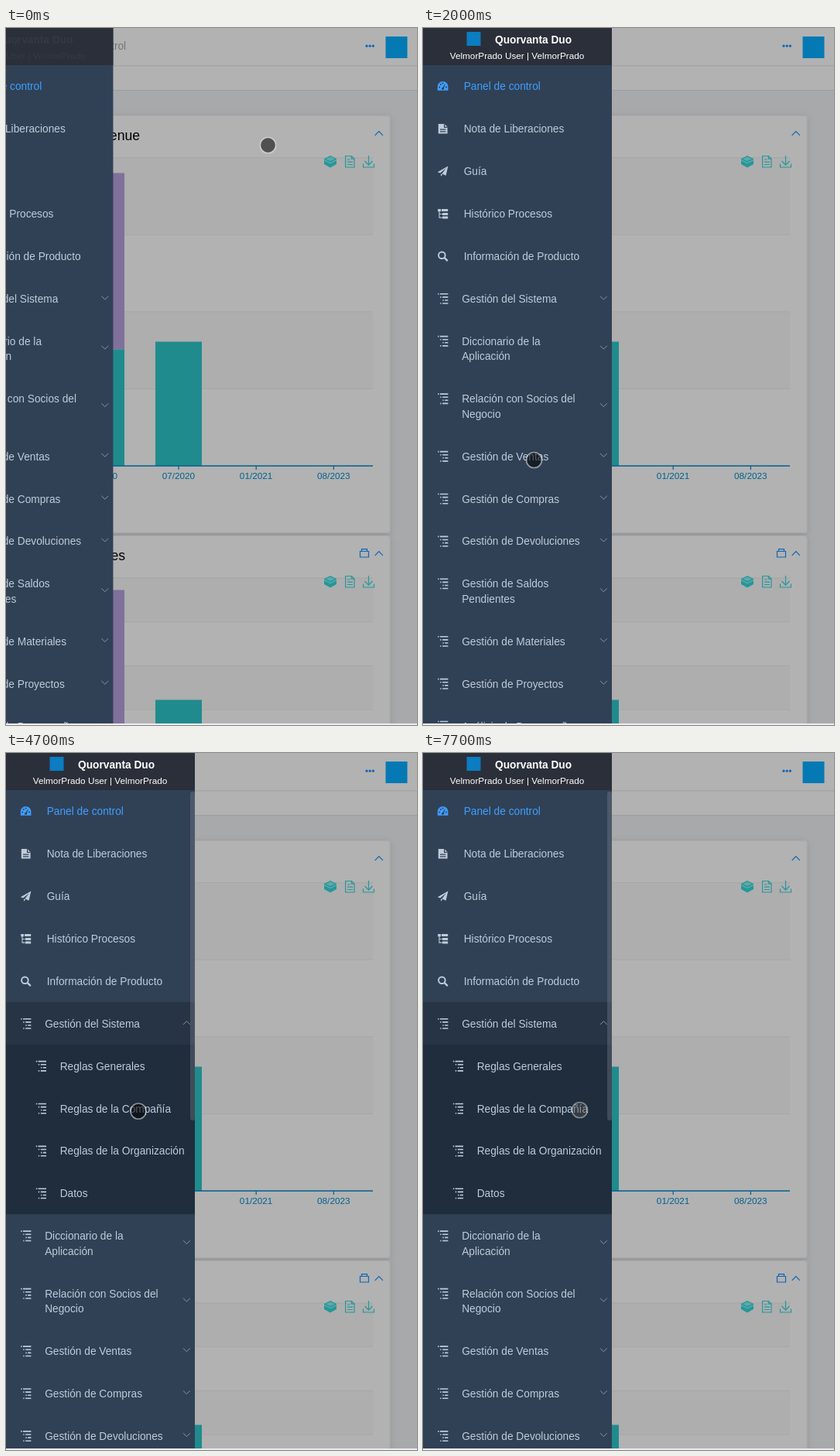
Recreate the animation shown at these times as an HTML page. Size 531 by 901 pixels, loop 8 s.

```html
<!DOCTYPE html>
<html lang="es">
<head>
<meta charset="utf-8">
<title>Panel de control</title>
<style>
  html, body { margin: 0; width: 100%; height: 100%; overflow: hidden; background: #a8a9ab; }
  svg { display: block; }
  text { font-family: "Liberation Sans", Arial, sans-serif; font-size: 13.72px; white-space: pre; }
  .small { font-size: 11.75px; }
  .title { font-size: 17.6px; }
</style>
</head>
<body>
<svg id="stage" width="531" height="901" viewBox="0 0 531 901">
  <defs>
    <filter id="shade" x="-10%" y="-10%" width="120%" height="120%">
      <feDropShadow dx="0" dy="2" stdDeviation="5" flood-color="#000" flood-opacity=".13"/>
    </filter>
    <g id="gauge">
      <path d="M-6.8 5.2V0A6.8 6.4 0 0 1 6.8 0V5.2Z" fill="#409eff"/>
      <g fill="#304156">
        <circle cx="-4.4" cy="1" r="1"/><circle cx="-2.8" cy="-2.4" r="1"/><circle cx="0" cy="-4" r="1"/>
        <circle cx="4.4" cy="1" r="1"/><circle cx="0" cy="2.8" r="1.6"/>
        <path d="M-.6 2.5L2.4-2.8 3.2-2.4 1 3Z"/>
      </g>
    </g>
    <g id="note">
      <path d="M-5.8-6.2H2L6-2.2V6.3H-5.8Z" fill="#bfcbd9"/>
      <path d="M2-6V-2H6M-3.6 .8H3.8M-3.6 3.5H3.8" fill="none" stroke="#304156" stroke-width="1.2"/>
    </g>
    <g id="plane" fill="#bfcbd9">
      <path d="M6.8-6.6L-6.8 1 -3.4 2.4 4.2-4 -1.2 3.4 4 5.6Z"/><path d="M-2.6 3.2V6.6L-.4 4.2Z"/>
    </g>
    <g id="tree">
      <path d="M-4.6-4V5H-1M-4.6 .4H-1" fill="none" stroke="#bfcbd9" stroke-width="1.1"/>
      <path d="M-6.4-6.2H-2.6V-2.8H-6.4ZM-1.6-6H6.6V-3H-1.6ZM-.6-1.2H6.6V1.9H-.6ZM-.6 3.5H6.6V6.5H-.6Z" fill="#bfcbd9"/>
    </g>
    <g id="lens" fill="none" stroke="#bfcbd9">
      <circle cx="-1.2" cy="-1.2" r="4.3" stroke-width="1.9"/>
      <path d="M2.2 2.2L6.2 6.2" stroke-width="2.3"/>
    </g>
    <path id="list" d="M-6.6-6.2h1.5M-3.8-6.2H6.6M-3.6-2.1h1.4M-.6-2.1H6.6M-.4 2h1.4M2.4 2H6.6M-3.6 6.1h1.4M-.6 6.1H6.6" fill="none" stroke="#bfcbd9" stroke-width="1.6"/>
    <path id="arrow" d="M-4.4-2.2L0 2.2 4.4-2.2" fill="none" stroke="#8995a3" stroke-width="1"/>
    <g id="tools" fill="none" stroke="#25989a" stroke-width="1.2">
      <path d="M411 169L419 165 427 169V176L419 180.500 411 176Z" fill="#25989a" stroke="none"/>
      <path d="M413 169.200L419 166.400 425 169.200 419 172Z" fill="#62a7a7" stroke="none"/>
      <path d="M411 170.600L419 174.600 427 170.600" stroke="#8fb0b0" stroke-width=".9"/>
      <path d="M438.600 165.500H446.500L450 169V180H438.600Z M446.300 165.500V169.200H450M441 170H444.500M441 173.200H448M441 176.500H448"/>
      <path d="M468.500 165V177M463.500 172L468.500 177.200 473.500 172M461.500 175.500V180H475.500V175.500"/>
    </g>
    <path id="fold" d="M476.700 138.800L481.800 133.500 486.900 138.800" fill="none" stroke="#1165b3" stroke-width="1.2"/>
  </defs>
</svg>
<script>
const NS = 'http://www.w3.org/2000/svg';
const stage = document.getElementById('stage');
const LOOP = 8000, STEP = 100;
const WIDTH = 244, ROW = 54.88, TALL = 74.5, LINE = 19.6, TOP = 47.6;
const SUB_TOP = TOP + 6 * ROW, SUB_H = 4 * ROW;
const INK = '#bfcbd9';

function el(tag, attrs, parent = stage) {
  const node = document.createElementNS(NS, tag);
  for (const k in attrs) node.setAttribute(k, attrs[k]);
  return parent.appendChild(node);
}
const rect = (x, y, width, height, fill, parent) => el('rect', { x, y, width, height, fill }, parent);
const icon = (id, x, y, parent) => el('use', { href: '#' + id, x, y }, parent);
function label(str, x, y, parent, attrs = {}) {
  const node = el('text', { x, y, fill: INK, ...attrs }, parent);
  node.textContent = str;
  return node;
}

// Dimmed page
const page = el('g', {});
rect(0, 0, 531, 901, '#a8a9ab', page);
rect(0, 0, 531, 80, '#b2b2b2', page);
rect(0, 48, 531, 1.5, '#a5a6a8', page);
rect(0, 80, 531, 1, '#9b9da1', page);
label('Panel de control', 56, 28, page, { fill: '#73767b' });
for (const cx of [466, 470.2, 474.4]) el('circle', { cx, cy: 23.2, r: 1.6, fill: '#1165b3' }, page);
rect(490.5, 11, 28, 28, '#0479b4', page);

function card(y, h, title, titleEnd) {
  el('rect', { x: 35, y, width: 461, height: h, rx: 3, fill: '#b2b2b2', stroke: '#a9abaf', 'stroke-width': .8, filter: 'url(#shade)' }, page);
  label(title, titleEnd, y + 31, page, { fill: '#000', class: 'title', 'text-anchor': 'end' });
}
function bands(y, h, n) {
  for (let i = 0; i < n; i++) {
    if (i % 2 === 0) rect(73, y + i * h, 401, h, '#aeaeae', page);
    rect(73, y + i * h - .5, 401, 1, '#a6a6a6', page);
  }
}
const PURPLE = '#7f719b', TEAL = '#208b8d', AXIS = '#00618f';

card(113.5, 539, 'Revenue', 173);
bands(167.5, 99.7, 4);
rect(93, 187.5, 60, 228, PURPLE, page);
rect(93, 415.5, 60, 150.5, TEAL, page);
rect(193, 405.5, 60, 160.5, TEAL, page);
rect(73, 565.3, 401, 1.5, AXIS, page);
['01/2020', '07/2020', '01/2021', '08/2023'].forEach((s, i) => {
  const x = 122.7 + i * 100.2;
  rect(x - .5, 566, 1.2, 5, AXIS, page);
  label(s, x, 583, page, { fill: AXIS, class: 'small', 'text-anchor': 'middle' });
});

card(656.5, 260, 'Sales', 154);
bands(711, 56.7, 4);
rect(93, 726.5, 60, 180, PURPLE, page);
rect(193, 868.5, 60, 40, TEAL, page);
for (const dy of [0, 543]) {
  icon('tools', 0, dy, page);
  icon('fold', 0, dy, page);
}
el('path', { d: 'M457.500 676.500H468.500V684H457.500ZM459.500 676V673.700H466.500V676', fill: 'none', stroke: '#1165b3', 'stroke-width': 1.2 }, page);

// Sidebar
const side = el('g', {});
rect(0, 0, WIDTH, 901, '#304156', side);
rect(0, 0, WIDTH, 48, '#2b2f3a', side);
const brand = el('g', {}, side);
rect(56.5, 5, 18, 18, '#0b7dc0', brand);
label('Quorvanta Duo', 93, 20, brand, { fill: '#fff', 'font-weight': 700 });
label('VelmorPrado User | VelmorPrado', 121.5, 40, brand, { fill: '#fff', class: 'small', 'text-anchor': 'middle' });

const mid = i => TOP + (i + .5) * ROW;
[['gauge', 'Panel de control'], ['note', 'Nota de Liberaciones'], ['plane', 'Guía'],
 ['tree', 'Histórico Procesos'], ['lens', 'Información de Producto']].forEach(([id, s], i) => {
  icon(id, 25.6, mid(i) + .4, side);
  label(s, 52.7, mid(i) + 5, side, i ? {} : { fill: '#409eff' });
});

const head = rect(0, SUB_TOP - ROW, WIDTH, ROW, '#263445', side);
icon('list', 25.8, mid(5) + .5, side);
label('Gestión del Sistema', 50.2, mid(5) + 5.3, side);
const headArrow = icon('arrow', 0, 0, side);

const sub = el('svg', { x: 0, y: SUB_TOP, width: WIDTH, height: 0 }, side);
rect(0, 0, WIDTH, SUB_H, '#1f2d3d', sub);
['Reglas Generales', 'Reglas de la Compañía', 'Reglas de la Organización', 'Datos'].forEach((s, i) => {
  const y = (i + .5) * ROW;
  icon('list', 45.4, y + .5, sub);
  label(s, 69.7, y + 5.4, sub);
});

const rest = el('g', {}, side);
let rowTop = SUB_TOP;
for (const s of ['Diccionario de la/Aplicación', 'Relación con Socios del/Negocio', 'Gestión de Ventas',
  'Gestión de Compras', 'Gestión de Devoluciones', 'Gestión de Saldos/Pendientes',
  'Gestión de Materiales', 'Gestión de Proyectos', 'Análisis de Desempeño']) {
  const lines = s.split('/'), h = lines.length > 1 ? TALL : ROW, y = rowTop + ROW / 2;
  icon('list', 25.8, y + .5, rest);
  lines.forEach((line, i) => label(line, 50.2, y + 5.3 + i * LINE, rest));
  icon('arrow', 233.4, rowTop + h / 2 - 1.2, rest);
  rowTop += h;
}

const tap = rect(0, SUB_TOP - ROW, WIDTH, ROW, '#33b5e5', side);
tap.setAttribute('opacity', .4);
const thumb = el('rect', { x: 238, y: 50, width: 6, rx: 3, fill: '#909399' }, side);

const touch = el('circle', { r: 10, 'stroke-width': 1.7 });
rect(0, 899, 531, 2, '#ebe9f1');

// Motion
const path = [
  [0, 338.5, 151.5], [600, 207.5, 269.5], [1000, 209, 395], [1300, 196, 520], [1500, 178, 588], [1900, 178, 588],
  [2000, 143.5, 558.5], [2400, 136, 328], [2800, 136, 328], [2900, 144.5, 356.5], [3200, 144.5, 356.5],
  [3800, 135.5, 439.5], [4100, 156, 476], [4300, 151.5, 474], [4700, 171, 463], [4800, 171, 463],
  [5200, 206, 444], [5300, 206, 444], [5500, 202.5, 461.5]
];
function along(t) {
  const i = path.findIndex(p => p[0] > t);
  if (i < 0) return path[path.length - 1].slice(1);
  const a = path[i - 1], b = path[i], k = (t - a[0]) / (b[0] - a[0]);
  return [a[1] + (b[1] - a[1]) * k, a[2] + (b[2] - a[2]) * k];
}

// cubic-bezier(.25, .1, .25, 1)
function ease(x) {
  if (x >= 1) return 1;
  const curve = (u, p, q) => 3 * u * (1 - u) ** 2 * p + 3 * u * u * (1 - u) * q + u ** 3;
  let lo = 0, hi = 1;
  for (let i = 0; i < 24; i++) {
    const m = (lo + hi) / 2;
    if (curve(m, .25, .25) < x) lo = m; else hi = m;
  }
  return curve(lo, .1, 1);
}

const show = (node, on) => node.setAttribute('display', on ? 'inline' : 'none');

function draw(time) {
  const t = Math.floor(time % LOOP / STEP) * STEP;
  const lead = 92;   // the drawer is already sliding when the loop begins
  side.setAttribute('transform', `translate(${(WIDTH * (ease((t + lead) / 280) - 1)).toFixed(2)} 0)`);
  brand.setAttribute('opacity', ease((t + lead) / 1500));

  const opening = t >= 2900 && t < 3100, open = t >= 3100;
  const h = open ? SUB_H : opening ? 13 : 0;
  sub.setAttribute('height', h);
  show(sub, h > 0);
  rest.setAttribute('transform', `translate(0 ${h})`);
  headArrow.setAttribute('transform', `translate(233.4 ${mid(5) - .6}) rotate(${open ? 180 : opening ? 45 : 0})`);
  show(head, open);
  show(tap, opening);
  show(thumb, open || opening);
  thumb.setAttribute('height', open ? 425 : 490);
  thumb.setAttribute('opacity', open ? .3 : .06);

  const [x, y] = along(t), held = t >= 5700;
  touch.setAttribute('cx', x);
  touch.setAttribute('cy', y);
  touch.setAttribute('fill', held ? 'rgba(80,80,80,.45)' : 'rgba(0,0,0,.55)');
  touch.setAttribute('stroke', `rgba(255,255,255,${held ? .42 : .5})`);
}

const start = performance.now();
function tick() {
  draw(performance.now() - start);
  requestAnimationFrame(tick);
}
tick();
</script>
</body>
</html>
```
